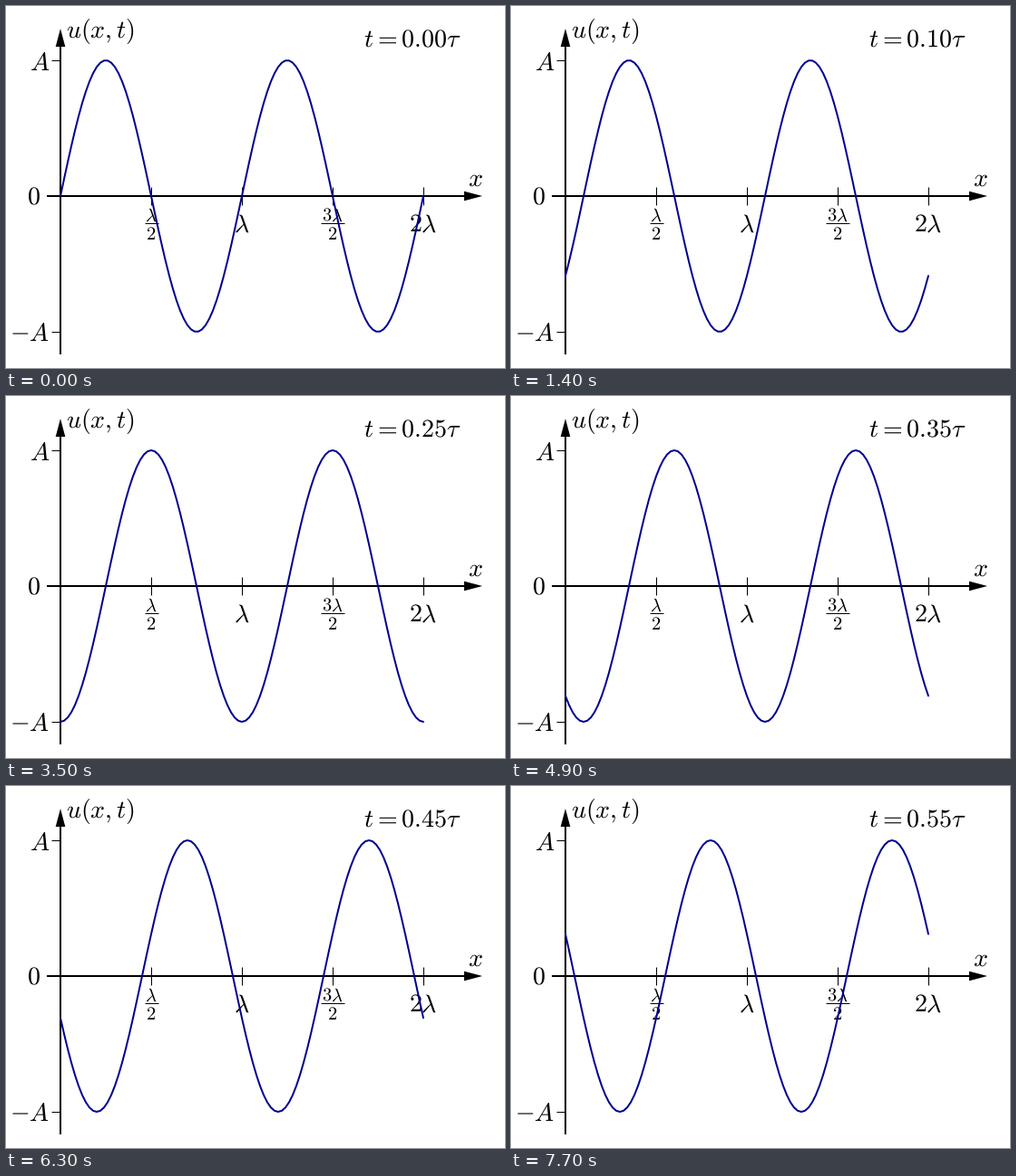
These frames come from a looping animation (550x400 px, 8000 ms). A matplotlib script:

```python
import numpy as np
import matplotlib.pyplot as plt
from matplotlib.animation import FuncAnimation

W, H, DPI = 550, 400, 100
PT = 72 / DPI                      # points per pixel
X0, Y0 = 60, 210                   # origin
WAVELENGTH, AMP = 200, 150
FRAME_MS, STEP_MS, LOOP_MS = 100, 700, 8000

plt.rcParams["mathtext.fontset"] = "cm"
plt.rcParams["text.hinting"] = "none"

fig = plt.figure(figsize=(W / DPI, H / DPI), dpi=DPI, facecolor="white")
ax = fig.add_axes([0, 0, 1, 1])
ax.set(xlim=(0, W), ylim=(H, 0))
ax.axis("off")


def line(xs, ys, width, color="black", **kw):
    return ax.plot(xs, ys, color=color, lw=width * PT, **kw)[0]


def label(x, y, tex, size=28, ha="left"):
    return ax.text(x, y, f"${tex}$", fontsize=size * PT, ha=ha, va="baseline")


def arrowhead(points):
    ax.fill(*zip(*points), color="black", lw=0)


def fraction(x, top, bottom, half):
    label(x, 238, top, 20.5, "center")
    line([x - half, x + half], [240, 240], 1, solid_capstyle="butt")
    label(x, 258, bottom, 20.5, "center")


# Axes
line([45, 510], [Y0, Y0], 2, solid_capstyle="butt")
line([X0, X0], [385, 40], 2, solid_capstyle="butt")
arrowhead([(525, Y0), (505, Y0 - 5.3), (505, Y0 + 5.3)])
arrowhead([(X0, 25), (X0 - 5.3, 45), (X0 + 5.3, 45)])

# Ticks
for k in range(1, 5):
    x = X0 + k * WAVELENGTH / 2
    line([x, x], [Y0 - 10, Y0 + 10], 1, solid_capstyle="butt")
for y in (Y0 - AMP, Y0 + AMP):
    line([50, X0], [y, y], 1, solid_capstyle="butt")

# Labels
label(66, 35, "u(x,t)")
label(509, 199, "x")
label(48, 71, "A", ha="right")
label(38, 219, "0", ha="right")
label(48, 370, "-A", ha="right")
fraction(160, r"\lambda", "2", 7.5)
label(260, 250, r"\lambda", ha="center")
fraction(360, r"3\lambda", "2", 13)
label(460, 250, r"2\lambda", ha="center")
clock = label(394, 45, r"t=0.00\tau")

# Travelling wave
phase = np.linspace(0, 2, 101)
wave = line(X0 + WAVELENGTH * phase, 0 * phase, 2, "#00008f",
            snap=False, solid_capstyle="round", zorder=3)


def update(i):
    t = 0.05 * (i * FRAME_MS // STEP_MS)
    wave.set_ydata(Y0 - AMP * np.sin(2 * np.pi * (phase - t)))
    clock.set_text(rf"$t={t:.2f}\tau$")
    return wave, clock


anim = FuncAnimation(fig, update, frames=LOOP_MS // FRAME_MS,
                     interval=FRAME_MS, repeat=True, repeat_delay=0)
plt.show()
```
